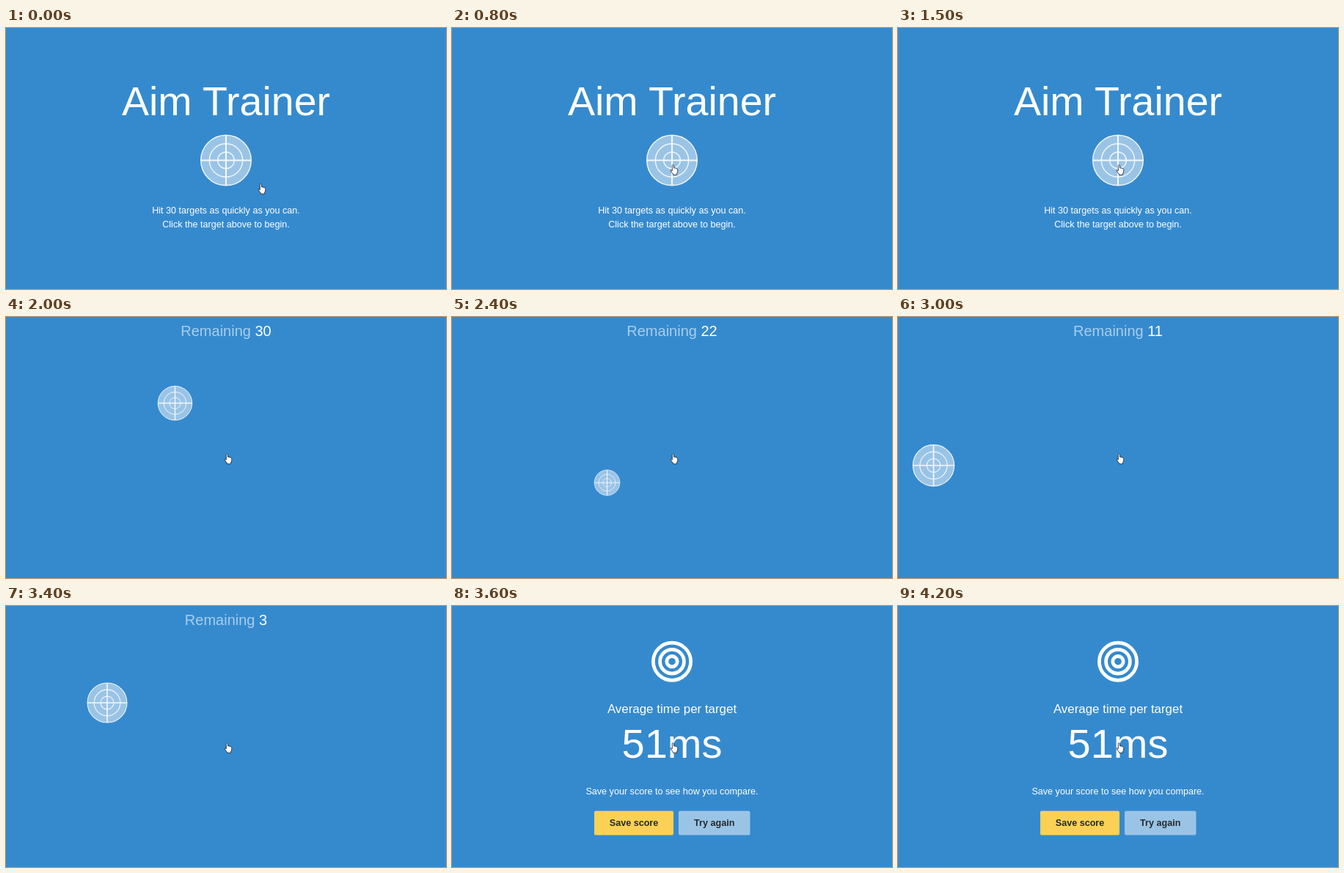
Animation, 600 px wide and 356 px high, one loop 5000 ms. Source, as an HTML page:

```html
<!DOCTYPE html>
<html lang="en">
<head>
<meta charset="utf-8">
<title>Aim Trainer</title>
<style>
  html, body { margin: 0; width: 100%; height: 100%; overflow: hidden; background: #358ace; }
  svg { display: block; width: 100%; height: 100%; }
  text { font: 12.6px "Liberation Sans", Arial, sans-serif; fill: #fff; text-anchor: middle; white-space: pre; }
  .huge { font-size: 56px; }
  .title { font-size: 55.6px; }
  .lead { font-size: 16.9px; }
  .count { font-size: 20px; fill: #a8cdea; }
  .count tspan { fill: #fff; }
  .button { font-weight: bold; fill: #25292d; }
  #disc { fill: none; stroke: #f2f8fd; stroke-width: 1.4; }
  #rings { fill: none; stroke: #fff; stroke-width: 4.8; }
</style>
</head>
<body>
<svg viewBox="0 0 600 356">
  <g id="intro">
    <text class="title" x="300" y="118.5">Aim Trainer</text>
    <text x="300" y="253">Hit 30 targets as quickly as you can.</text>
    <text x="300" y="272">Click the target above to begin.</text>
  </g>
  <g id="game">
    <text class="count" x="300" y="26">Remaining <tspan id="left">30</tspan></text>
  </g>
  <g id="disc">
    <circle r="34.3" fill="#9ac4e6"/>
    <circle r="22.7"/>
    <circle r="11.3"/>
    <path d="M-34 0H34M0 -34V34" stroke-width="2.1"/>
  </g>
  <g id="result">
    <g id="rings" transform="translate(300 75.7)">
      <circle r="25.6"/><circle r="16.4"/><circle r="7.2"/>
    </g>
    <text class="lead" x="300" y="145.5">Average time per target</text>
    <text class="huge" x="300" y="207">51ms</text>
    <text x="300" y="257">Save your score to see how you compare.</text>
    <rect x="194" y="279.5" width="108" height="33" rx="2" fill="#fad155"/>
    <text class="button" x="248" y="300">Save score</text>
    <rect x="309" y="279.5" width="97.5" height="33" rx="2" fill="#9ac4e6"/>
    <text class="button" x="357.7" y="300">Try again</text>
  </g>
  <path id="cursor" fill="#fff" stroke="#222b35" stroke-width=".9" stroke-linejoin="round"
    d="M2.8 1Q3.9 -.2 5 1V4.5Q8 4.6 10 6Q10.6 7 10.2 9Q10 11 9 12.5V14H4L3.9 12.8Q2 11 .4 8Q.6 6.8 2.8 8.4Z"/>
</svg>
<script>
  const STEP = 100, LOOP = 5000, GAME_START = 20, GAME_END = 36;
  const INTRO_DISC = [300, 180.5, 35];
  // x, y, radius of the disc visible in each step of the game
  const discs = [
    [230.5, 117.5, 23.7], [129, 200, 25], [418, 258, 26], [300, 120, 20],
    [211.5, 226, 17.7], [505, 150, 23], [330, 316, 24], [180, 90, 28],
    [420, 240, 20], [270, 170, 22], [48.5, 202.5, 28.7], [569, 140, 25],
    [330, 250, 26], [430, 90, 22], [138, 132, 27.5], [485, 180, 26]
  ];
  const el = id => document.getElementById(id);
  const show = (id, on) => el(id).setAttribute("display", on ? "inline" : "none");
  const place = (id, x, y, scale = 1) =>
    el(id).setAttribute("transform", `translate(${x} ${y}) scale(${scale})`);

  let lastStep = -1;

  function draw(step) {
    const round = step - GAME_START;
    const playing = step >= GAME_START && step < GAME_END;
    show("intro", step < GAME_START);
    show("game", playing);
    show("disc", step < GAME_END);
    show("result", step >= GAME_END);

    const [x, y, r] = playing ? discs[round] : INTRO_DISC;
    place("disc", x, y, r / 35);
    if (playing) el("left").textContent = 30 - Math.floor((round * STEP + 25) / 51.9);

    const away = 1 - Math.min(step / 8, 1) ** 2;
    place("cursor", 297.5 + 46 * away, 186.3 + 26 * away);
  }

  function tick() {
    const step = Math.floor(performance.now() % LOOP / STEP);
    if (step !== lastStep) draw(lastStep = step);
    requestAnimationFrame(tick);
  }
  tick();
</script>
</body>
</html>
```
